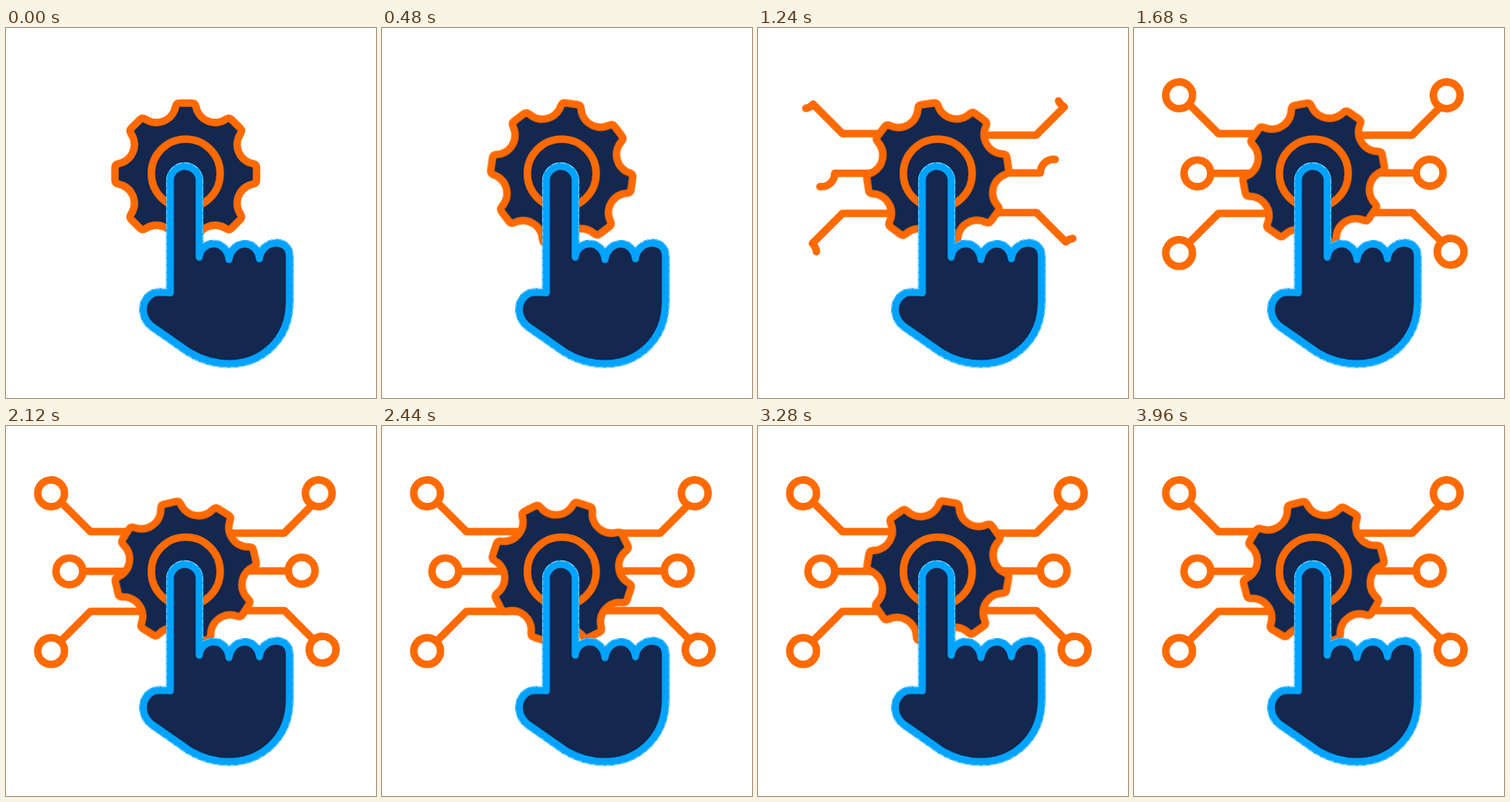
Animation, 473 px wide and 473 px high, one loop 4 s. Source, as an HTML page:

```html
<!DOCTYPE html>
<html lang="en">
<head>
<meta charset="utf-8">
<title>Tap to connect</title>
<style>
  html, body { margin: 0; width: 100%; height: 100%; overflow: hidden; background: #fff; }
  svg { display: block; width: 100vw; height: 100vh; }
  #links, #gear, #ring, #hand { stroke-linecap: round; stroke-linejoin: round; }
  #links { fill: none; stroke: #ff6a00; stroke-width: 9.6; }
  #gear, #ring { fill: #13274f; stroke: #ff6a00; stroke-width: 9.6; }
  #gear { transform-origin: 229.8px 186.5px; }
  #hand { fill: none; transform-origin: 269px 303px; }
</style>
</head>
<body>
<svg viewBox="0 0 473 473">
  <defs>
    <path id="palm" d="M210 338.5V195.5A18.5 18.5 0 0 1 247 195.5V293
      C250 270 282 270 285 296C289 270 321 270 324 295C326 271 362 267 362.3 292V350
      C362 400 325 429 285 429C262 429 245 421 234 414.5L186 381
      C167 365 176 338 196 338C203 338 207 338 210 338.5Z"/>
  </defs>
  <g id="links"></g>
  <path id="gear"/>
  <circle id="ring" cx="229.8" cy="186" r="44"/>
  <g id="hand">
    <use href="#palm" stroke="#00a3ff" stroke-width="10.8"/>
    <use href="#palm" stroke="#fff" stroke-width="9.8" stroke-dasharray="7 2" stroke-linecap="butt"/>
    <use href="#palm" fill="#13274f" stroke="#00a3ff" stroke-width="9"/>
  </g>
</svg>
<script>
const LOOP = 4000;
const byId = id => document.getElementById(id);

// Each step is [time in ms, value, optional easing].
function play(el, prop, steps) {
  const frames = steps.map(([ms, value, easing = 'linear']) =>
    ({ offset: ms / LOOP, [prop]: value, easing }));
  el.animate(frames, { duration: LOOP, iterations: Infinity });
}

// Teeth have softened corners and are joined by round hollows.
function gearPath(cx, cy, teeth) {
  const at = (x, y, turn) => {
    const c = Math.cos(turn), s = Math.sin(turn);
    return `${(cx + x * c - y * s).toFixed(2)} ${(cy + x * s + y * c).toFixed(2)}`;
  };
  let d = '';
  for (let i = 0; i < teeth; i++) {
    const turn = i * 2 * Math.PI / teeth;
    const next = turn + 2 * Math.PI / teeth;
    const p = (x, y) => at(x, y, turn);
    d += `${i ? 'L' : 'M'}${p(-13, -86)}Q${p(-12, -90.5)} ${p(-8, -90.5)}` +
         `L${p(8, -90.5)}Q${p(12, -90.5)} ${p(13, -86)}` +
         `L${p(14.5, -81)}A25 25 0 0 0 ${at(-14.5, -81, next)}`;
  }
  return d + 'Z';
}

// A line leaves the gear, may turn by 45 degrees, then runs once around its node.
function linkPath({ cx, cy, from, bend, y, r = 17.1 }) {
  const vx = cx - bend, vy = cy - y;
  const slope = bend === from ? 0 : Math.SQRT1_2;
  const ux = Math.sign(vx) * (slope || 1), uy = Math.sign(vy) * slope;
  const along = vx * ux + vy * uy;
  const reach = along - Math.sqrt(r * r - (vx * vx + vy * vy - along * along));
  const x1 = bend + ux * reach, y1 = y + uy * reach;
  const arc = `A${r} ${r} 0 0 1 `;
  return `M${from} ${y}H${bend}L${x1} ${y1}${arc}${2 * cx - x1} ${2 * cy - y1}${arc}${x1} ${y1}`;
}

const links = [
  { cx: 57.7, cy: 86, from: 198, bend: 108, y: 135 },
  { cx: 399.8, cy: 86, from: 263, bend: 355.5, y: 137 },
  { cx: 81, cy: 185.8, from: 195, bend: 195, y: 185.8 },
  { cx: 378, cy: 185, from: 265, bend: 265, y: 185.3 },
  { cx: 57.7, cy: 287.7, from: 194, bend: 108, y: 237 },
  { cx: 404.8, cy: 286, from: 264, bend: 356, y: 236 }
];

for (const link of links) {
  const path = document.createElementNS('http://www.w3.org/2000/svg', 'path');
  path.setAttribute('d', linkPath(link));
  path.setAttribute('pathLength', 1);
  path.setAttribute('stroke-dasharray', '1 2');
  byId('links').append(path);
  play(path, 'strokeDashoffset', [[0, 1], [600, 1], [1640, 0], [LOOP, 0]]);
}

byId('gear').setAttribute('d', gearPath(229.8, 186.5, 8));
play(byId('gear'), 'transform',
  [[0, 'rotate(0deg)'], [400, 'rotate(0deg)'], [LOOP, 'rotate(349.5deg)']]);

play(byId('hand'), 'transform', [
  [0, 'scale(1)', 'ease-in-out'],
  [200, 'scale(0.9)', 'ease-in-out'],
  [400, 'scale(1)'],
  [LOOP, 'scale(1)']
]);
</script>
</body>
</html>
```
